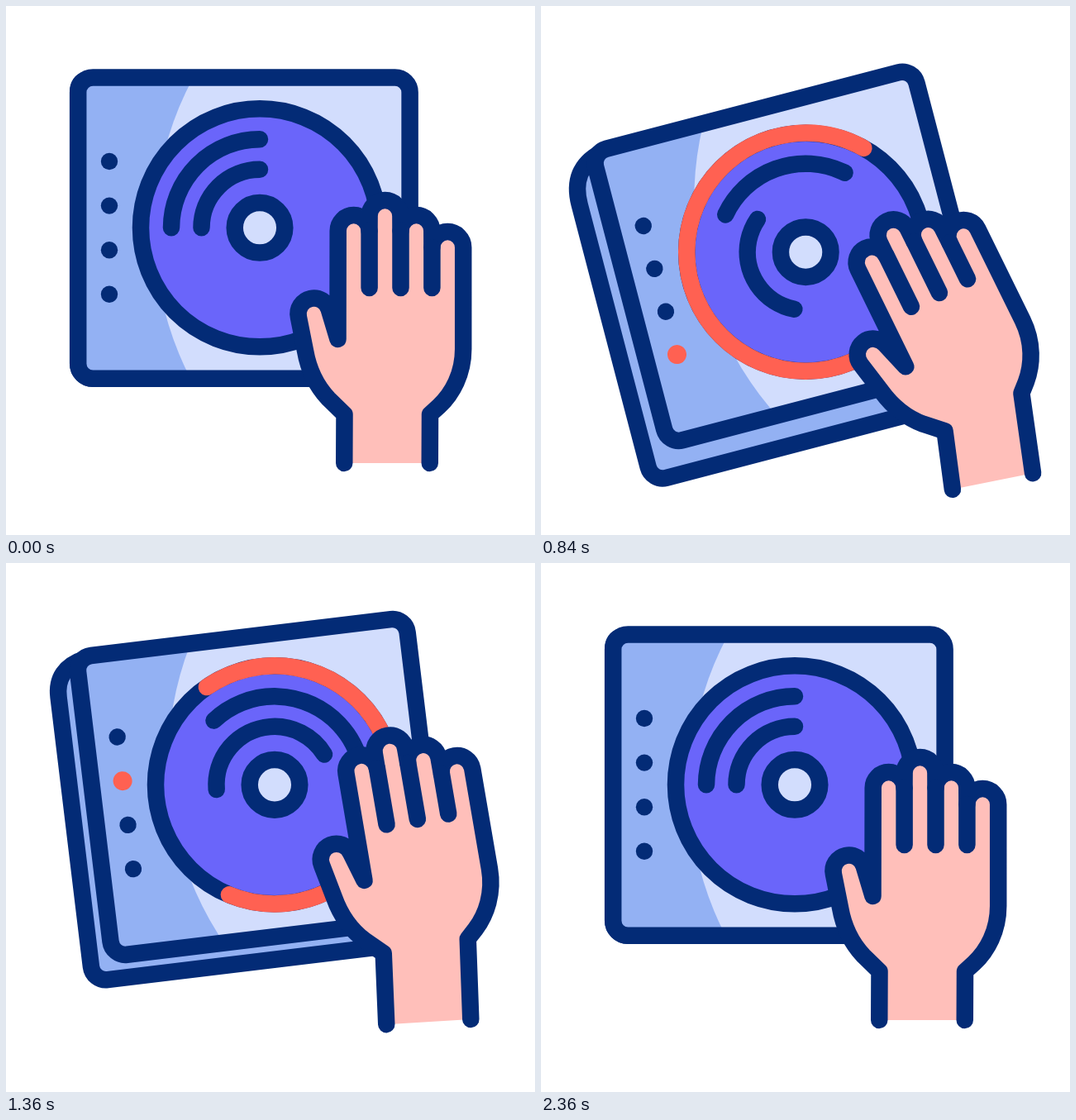
Write an HTML page with a canvas that moves like this. It is 640x640 px and loops after 2400 ms.

```html
<!DOCTYPE html>
<html lang="en">
<head>
<meta charset="utf-8">
<title>Turntable</title>
<style>
  html, body { margin: 0; width: 100%; height: 100%; overflow: hidden; background: #fff; }
  canvas { display: block; width: 640px; height: 640px; }
</style>
</head>
<body>
<canvas id="stage" width="640" height="640"></canvas>
<script>
const ctx = document.getElementById('stage').getContext('2d');
const LOOP = 2400, MOVE = 640, LINE = 20.5, TAU = Math.PI * 2;
const NAVY = '#032b76', BLUE = '#93b1f3', PALE = '#d2ddfd';
const VIOLET = '#6a65fa', SKIN = '#ffbfba', RED = '#ff6152';
const rad = deg => deg * Math.PI / 180;
const clamp = u => Math.min(1, Math.max(0, u));
const smooth = u => u * u * (3 - 2 * u);

// cubic-bezier(.4, 0, .2, 1), solved by bisection.
function ease(u) {
  u = clamp(u);
  let lo = 0, hi = 1;
  for (let i = 0; i < 24; i++) {
    const s = (lo + hi) / 2, v = 1 - s;
    if (1.2 * s * v * v + 0.6 * s * s * v + s * s * s < u) lo = s;
    else hi = s;
  }
  return smooth(lo);
}

// Every part goes rest -> deep -> light -> rest; only its cues differ.
const parts = {
  deck: {
    cues: [120, 760, 1680],
    rest: { angle: 0, x: 307, y: 268.3, dx: 0, dy: 0 },
    deep: { angle: 15, x: 320, y: 299, dx: 30.5, dy: 39.7 },
    light: { angle: 6.87, x: 325, y: 268.3, dx: 27, dy: 27.3 }
  },
  grooves: {
    cues: [151, 778, 1611],
    rest: { outerFrom: 180, outerTo: 270, innerFrom: 180, innerTo: 270 },
    deep: { outerFrom: 204.5, outerTo: 295, innerFrom: 99.5, innerTo: 211.5 },
    light: { outerFrom: 226.7, outerTo: 349, innerFrom: 175.7, innerTo: 329 }
  },
  hand: {
    cues: [179, 835, 1653],
    rest: { angle: 0, x: 477.5, y: 341 },
    deep: { angle: 26.2, x: 482, y: 347 },
    light: { angle: 9.4, x: 498.2, y: 309.5 }
  },
  wrist: {
    cues: [185, 870, 1640],
    rest: { angle: 0, x: 461, y: 553 },
    deep: { angle: 11.4, x: 546.5, y: 575 },
    light: { angle: 3.1, x: 510, y: 554.4 }
  }
};

function poseAt(t, { cues, rest, deep, light }) {
  const [down, up, home] = cues.map(cue => ease((t - cue) / MOVE));
  const a = down * (1 - up), b = up * (1 - home);
  const pose = { a };
  for (const k in rest) pose[k] = rest[k] + a * (deep[k] - rest[k]) + b * (light[k] - rest[k]);
  return pose;
}

// Deck edges relative to the record's centre.
const L = -219.8, R = 181.6, T = -181.9, B = 182.5, CORNER = 18;

function paint(fill, stroke) {
  if (fill) { ctx.fillStyle = fill; ctx.fill(); }
  if (stroke) { ctx.strokeStyle = stroke; ctx.stroke(); }
}

function disc(x, y, r, fill, stroke) {
  ctx.beginPath();
  ctx.arc(x, y, r, 0, TAU);
  paint(fill, stroke);
}

function arc(r, from, to, color) {
  ctx.beginPath();
  ctx.arc(0, 0, r, rad(from), rad(to));
  paint(null, color);
}

function drawSide(dx, dy) {
  ctx.beginPath();
  ctx.moveTo(L + 10, T + 3);
  ctx.quadraticCurveTo(L - dx, T + 5 + dy / 5, L - dx, T + CORNER + dy);
  ctx.arcTo(L - dx, B + dy, R, B + dy, CORNER);
  ctx.lineTo(R - CORNER - dx, B + dy);
  ctx.quadraticCurveTo(R - 8 - dx / 3, B + dy, R - 3, B - 10);
  ctx.lineTo(R - 3, T + 10);
  ctx.closePath();
  paint(BLUE, NAVY);
}

function drawTop() {
  const plate = new Path2D();
  plate.roundRect(L, T, R - L, B - T, CORNER);
  ctx.save();
  ctx.clip(plate);
  ctx.fillStyle = BLUE;
  ctx.fillRect(L, T, R - L, B - T);
  disc(262.7, 3.5, 390, PALE);
  ctx.restore();
  ctx.strokeStyle = NAVY;
  ctx.stroke(plate);
}

function drawLamps(t) {
  const step = Math.floor((t - 80) / 240);
  const lit = step >= 0 && step < 8 ? step % 4 : -1;
  for (let i = 0; i < 4; i++) {
    const on = i === lit;
    disc(-182, -80.3 + i * 53.6, on ? 11.5 : 10.2, on ? RED : NAVY);
  }
}

// The head runs fast, then slowly; the tail catches up with it.
function drawGlow(t) {
  const head = 45 + 391 * clamp((t - 320) / 800) + 140 * clamp((t - 1120) / 920);
  const tail = 45 + 532 * smooth(clamp((t - 835) / 1300));
  if (head - tail > 0.5) arc(144, tail, head, RED);
}

function drawRecord(t) {
  const g = poseAt(t, parts.grooves);
  disc(0, 0, 144, VIOLET, NAVY);
  drawGlow(t);
  arc(107, g.outerFrom, g.outerTo, NAVY);
  arc(70.5, g.innerFrom, g.innerTo, NAVY);
  disc(0, 0, 30.3, PALE, NAVY);
}

function drawDeck(t) {
  const deck = poseAt(t, parts.deck);
  ctx.save();
  ctx.translate(deck.x, deck.y);
  ctx.save();
  ctx.rotate(-rad(deck.angle));
  drawSide(deck.dx, deck.dy);
  drawTop();
  drawLamps(t);
  ctx.restore();
  drawRecord(t);
  ctx.restore();
}

function enterHand({ a, angle, x, y }) {
  const lift = 16 * a * (1 - a);
  ctx.save();
  ctx.translate(x, y - lift);
  ctx.rotate(-rad(angle));
  ctx.translate(-477.5, -341);
}

function drawHand(t) {
  const hand = poseAt(t, parts.hand), wrist = poseAt(t, parts.wrist);
  const half = (103.5 - 0.38 * wrist.angle) / 2;
  const ex = half * Math.cos(rad(wrist.angle)), ey = half * Math.sin(rad(wrist.angle));

  // The palm turns as one piece; the wrist ends move on their own.
  ctx.beginPath();
  ctx.moveTo(wrist.x - ex, wrist.y + ey);
  enterHand(hand);
  ctx.lineTo(409.5, 494);
  ctx.lineTo(390, 475);
  ctx.bezierCurveTo(374, 458, 366, 440, 362, 417);
  ctx.arc(372.5, 372.5, 19, 2.93, 6.03);
  ctx.lineTo(401.5, 403);
  const rows = [272, 254, 272, 292];
  rows.forEach((y, i) => ctx.arc(420.6 + 37.9 * i, y, 18.9, Math.PI, TAU));
  ctx.lineTo(553.2, 415);
  ctx.bezierCurveTo(553.2, 445, 540, 469, 524, 484);
  ctx.lineTo(513, 494);
  ctx.restore();
  ctx.lineTo(wrist.x + ex, wrist.y - ey);
  paint(SKIN, NAVY);

  enterHand(hand);
  ctx.beginPath();
  for (let i = 0; i < 3; i++) {
    const x = 439.6 + 37.9 * i;
    ctx.moveTo(x, Math.max(rows[i], rows[i + 1]));
    ctx.lineTo(x, 341);
  }
  paint(null, NAVY);
  ctx.restore();
}

function draw(t) {
  ctx.fillStyle = '#fff';
  ctx.fillRect(0, 0, 640, 640);
  ctx.lineWidth = LINE;
  ctx.lineCap = ctx.lineJoin = 'round';
  drawDeck(t);
  drawHand(t);
}

let start = null;
function loop(now) {
  if (start === null) start = now;
  draw(Math.max(0, now - start) % LOOP);
  requestAnimationFrame(loop);
}
draw(0);
requestAnimationFrame(loop);
</script>
</body>
</html>
```
